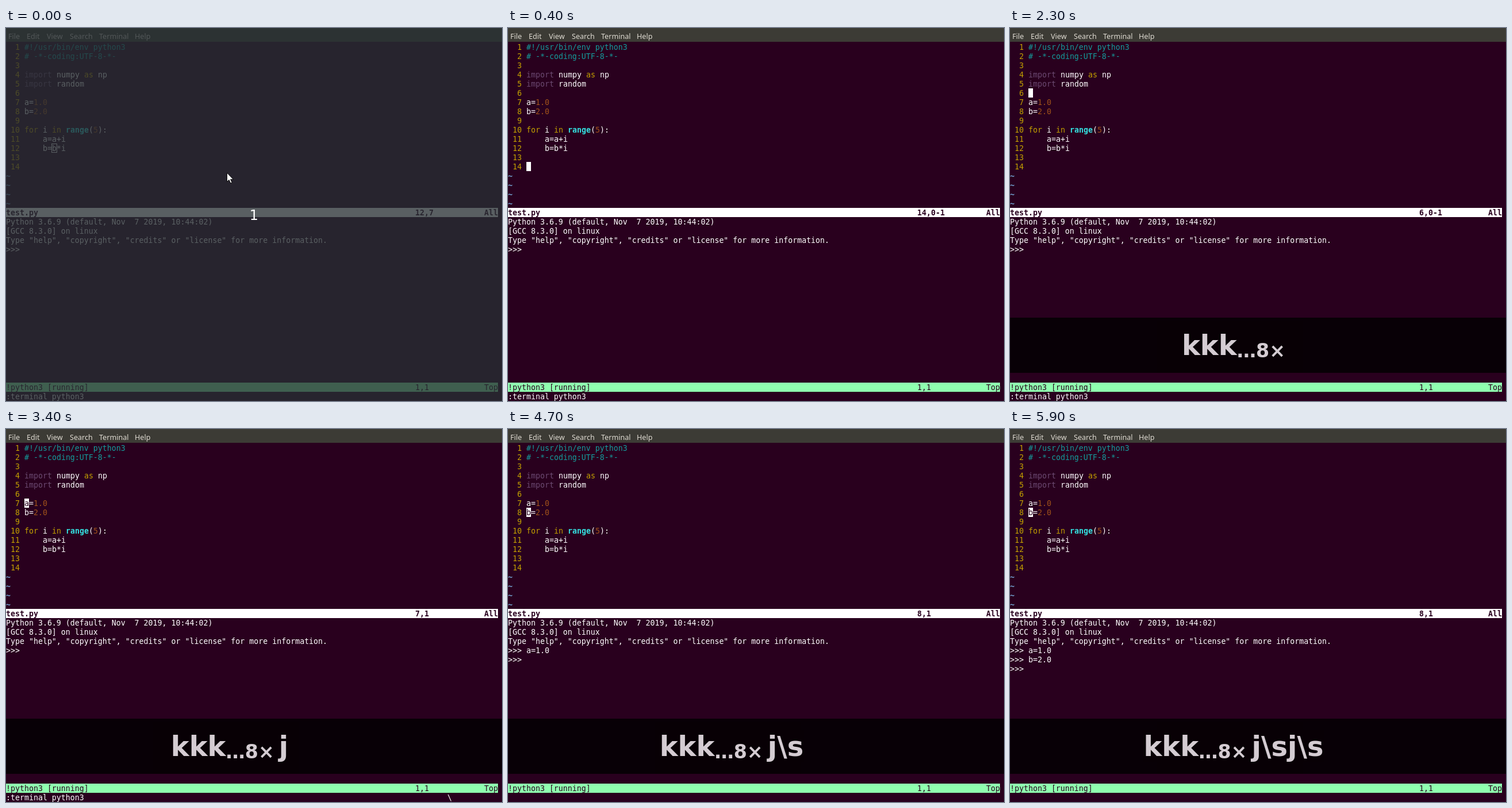
An HTML page that plays this animation: 863 by 649 pixels, repeating every 8 s.

```html
<!DOCTYPE html>
<html lang="en">
<head>
<meta charset="utf-8">
<title>Editor and terminal</title>
<style>
  html, body { margin: 0; width: 100%; height: 100%; overflow: hidden; background: #29001e; }
  svg { display: block; }
  text { white-space: pre; fill: #fff; font: 13.288px "DejaVu Sans Mono", monospace; }
  .menu { fill: #dfdbd2; font: 12.6px "Noto Sans", "Open Sans", sans-serif; }
  .num, .word { fill: #c4a000; }
  .note { fill: #159b9b; }
  .load { fill: #6c4a72; }
  .call { fill: #34e2e2; font-weight: bold; }
  .digit { fill: #a0521a; }
  .tilde { fill: #729fcf; font-weight: bold; }
  .dark { fill: #29001e; }
  .bold { font-weight: bold; }
  .count { font: 24px "DejaVu Sans", sans-serif; text-anchor: middle; }
  .keys { font: bold 48px "DejaVu Sans", sans-serif; text-anchor: middle; }
  .small { font-size: 33.3px; }
</style>
</head>
<body>
<script>
const LOOP = 8000, CELL = 8, LINE = 16, MID = 389;

const code = [
  "#!/usr/bin/env python3", "# -*-coding:UTF-8-*-", "",
  "import numpy as np", "import random", "",
  "a=1.0", "b=2.0", "",
  "for i in range(5):", "    a=a+i", "    b=b*i", "", ""
];
const sent = [">>> a=1.0", ">>> b=2.0"];

// time, cursor row, column, lines sent, number of k, other keys, last key is recent, pending key
const steps = [
  [0, 12, 6, 0, 0, "", 0, ""],
  [400, 14, 0, 0, 0, "", 0, ""],
  [1500, 14, 0, 0, 1, "", 1, ""],
  [1600, 13, 0, 0, 1, "", 0, ""],
  [1900, 12, 0, 0, 2, "", 1, ""],
  [2000, 9, 0, 0, 5, "", 0, ""],
  [2100, 7, 0, 0, 7, "", 0, ""],
  [2300, 6, 0, 0, 8, "", 0, ""],
  [2600, 7, 0, 0, 8, "j", 1, ""],
  [2700, 7, 0, 0, 8, "j", 0, ""],
  [3400, 7, 0, 0, 8, "j", 0, "\\"],
  [3500, 7, 0, 0, 8, "j\\", 1, "\\"],
  [3600, 7, 0, 0, 8, "j\\", 0, "\\"],
  [3800, 7, 0, 1, 8, "j\\s", 1, ""],
  [3900, 7, 0, 1, 8, "j\\s", 0, ""],
  [4700, 8, 0, 1, 8, "j\\s", 0, ""],
  [4800, 8, 0, 1, 8, "j\\sj", 1, ""],
  [4900, 8, 0, 1, 8, "j\\sj", 0, ""],
  [5400, 8, 0, 1, 8, "j\\sj", 0, "\\"],
  [5500, 8, 0, 1, 8, "j\\sj\\", 1, "\\"],
  [5600, 8, 0, 1, 8, "j\\sj\\", 0, "\\"],
  [5700, 8, 0, 2, 8, "j\\sj\\", 0, ""],
  [5800, 8, 0, 2, 8, "j\\sj\\s", 1, ""],
  [5900, 8, 0, 2, 8, "j\\sj\\s", 0, ""]
];

function add(tag, attrs, parent, str = "") {
  const el = document.createElementNS("http://www.w3.org/2000/svg", tag);
  for (const name in attrs) el.setAttribute(name, attrs[name]);
  el.textContent = str;
  parent.append(el);
  return el;
}
const svg = add("svg", { width: 863, height: 649, viewBox: "0 0 863 649" }, document.body);
const rect = (x, y, width, height, fill, parent = svg) =>
  add("rect", { x, y, width, height, fill }, parent);
const rowTop = row => 9 + LINE * row;
const write = (col, row, str, cls = "") =>
  add("text", { x: col * CELL, y: rowTop(row) + 13, class: cls }, svg, str);
const show = (el, on) => { el.style.display = on ? "" : "none"; };

rect(0, 0, 863, 649, "#29001e");
rect(0, 0, 863, 24, "#3c3b35");
[["File", 4], ["Edit", 36], ["View", 71], ["Search", 111], ["Terminal", 162], ["Help", 224]]
  .forEach(([str, x]) => add("text", { x, y: 18.5, class: "menu" }, svg, str));

// Editor
const kinds = ["note", "load", "word", "call", "digit"];
const token = /(#.*)|(\bimport\b)|(\b(?:as|for|in)\b)|(\brange\b)|(\d(?:\.\d)?)/g;
code.forEach((src, i) => {
  write(0, i + 1, String(i + 1).padStart(3), "num");
  let at = 0;
  const plain = end => { if (end > at) write(4 + at, i + 1, src.slice(at, end)); };
  for (const m of src.matchAll(token)) {
    plain(m.index);
    write(4 + m.index, i + 1, m[0], kinds[m.slice(1).findIndex(Boolean)]);
    at = m.index + m[0].length;
  }
  plain(src.length);
});
for (let row = 15; row < 19; row++) write(0, row, "~", "tilde");

const block = rect(0, 0, CELL, LINE, "#fff");
const under = write(0, 1, "", "dark");
const hollow = add("rect", { x: 79.5, y: 201.5, width: 9, height: 15, fill: "none", stroke: "#fff" }, svg);

rect(0, rowTop(19), 856, LINE, "#fff");
write(0, 19, "test.py", "dark bold");
const place = write(89, 19, "", "dark bold");
write(104, 19, "All", "dark bold");

// Terminal
[
  "Python 3.6.9 (default, Nov  7 2019, 10:44:02)",
  "[GCC 8.3.0] on linux",
  'Type "help", "copyright", "credits" or "license" for more information.'
].forEach((str, i) => write(0, 20 + i, str));
const shell = [0, 1, 2].map(i => write(0, 23 + i, ""));

rect(0, rowTop(38), 856, LINE, "#8fffaf");
write(0, 38, "!python3 [running]", "dark");
write(89, 38, "1,1", "dark");
write(104, 38, "Top", "dark");
const command = write(0, 39, ":terminal python3");
const pending = write(96, 39, "");

// Pressed keys
const band = add("g", { opacity: 0.8 }, svg);
rect(0, 504, 863, 96, "#000", band);
const keyText = add("text", { x: MID, y: 569, class: "keys" }, band);
const keyLine = rect(0, 573, 0, 2, "#fff", band);

// Countdown
const dim = add("g", {}, svg);
rect(0, 0, 863, 649, "rgba(40,47,51,.77)", dim);
add("text", { x: 431.5, y: 334, class: "count" }, dim, "1");
const mouse = add("path", {
  d: "M384.5 252v15.5l3.6-3.3 2.6 5.8 2.5-1.1-2.6-5.6h4.8z",
  fill: "#fff", stroke: "#000", "stroke-width": 0.9
}, svg);

function setKeys(count, rest, recent) {
  show(band, count);
  keyText.textContent = "";
  if (!count) return;
  const many = count > 3;
  add("tspan", {}, keyText, "k".repeat(Math.min(count, 3)));
  if (many) add("tspan", { class: "small", dy: 4 }, keyText, `…${count}×`);
  if (rest) add("tspan", { dx: 8, dy: -4 }, keyText, rest);
  show(keyLine, recent);
  if (!recent) return;
  const last = keyText.getNumberOfChars() - 1;
  const x = keyText.getStartPositionOfChar(last).x;
  keyLine.setAttribute("x", x);
  keyLine.setAttribute("width", keyText.getEndPositionOfChar(last).x - x);
}

function setStep([time, row, col, lines, count, rest, recent, wait]) {
  const src = code[row - 1], x = (4 + col) * CELL;
  block.setAttribute("x", x);
  block.setAttribute("y", rowTop(row));
  under.setAttribute("x", x);
  under.setAttribute("y", rowTop(row) + 13);
  under.textContent = src[col] || "";
  place.textContent = `${row},${src ? col + 1 : "0-1"}`;
  shell.forEach((el, i) => { el.textContent = i < lines ? sent[i] : i === lines ? ">>>" : ""; });
  show(command, !lines);
  pending.textContent = wait;
  setKeys(count, rest, recent);
  show(mouse, time < 400);
}

let current;
function draw(now) {
  const t = now % LOOP;
  const step = steps.findLast(s => s[0] <= t) || steps[0];
  if (step !== current) setStep(current = step);
  const idle = t < 300;
  const busy = t >= 3800 && t < 3900;
  show(dim, idle);
  show(hollow, idle);
  show(block, !idle && !busy);
  show(under, !idle && !busy);
}

const start = performance.now();
function tick() {
  draw(performance.now() - start);
  requestAnimationFrame(tick);
}
tick();
</script>
</body>
</html>
```
